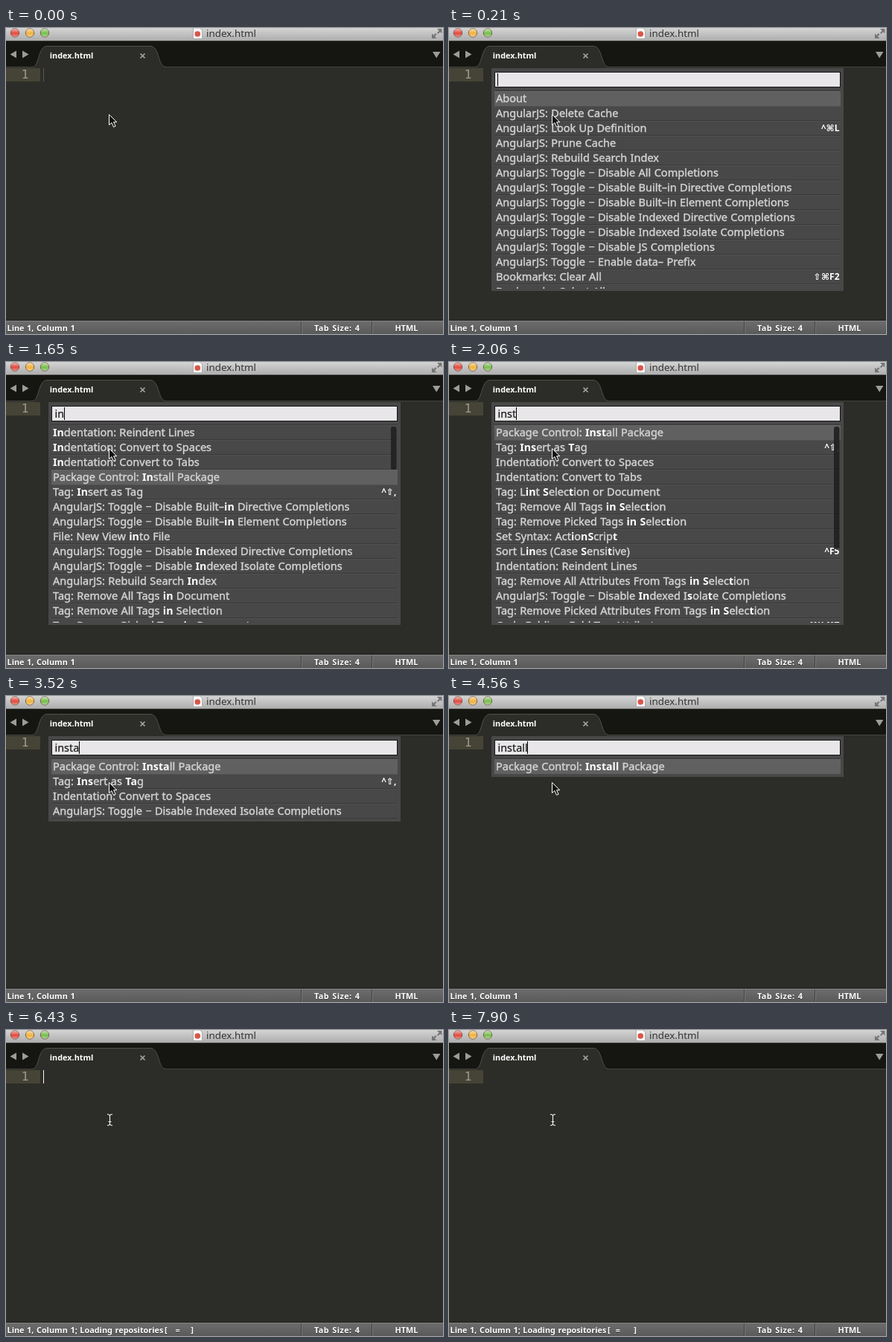
An HTML page that plays this animation: 587 px wide and 412 px high, repeating every 8 s.

```html
<!DOCTYPE html>
<html lang="en">
<head>
<meta charset="utf-8">
<title>Editor command palette</title>
<style>
html, body { margin: 0; width: 100%; height: 100%; overflow: hidden; background: #2c2d28; }
svg { display: block; width: 587px; height: 412px; }
text { white-space: pre; font-family: "Noto Sans", "Open Sans", sans-serif; }
.ui { font-weight: 700; font-size: 10.85px; word-spacing: .8px; fill: #fff; }
.status { filter: drop-shadow(0 1px 0 #333); }
.row { font-size: 14.55px; word-spacing: .5px; fill: #d4d4d4; stroke: #d4d4d4; stroke-width: .4px; }
.row .hit { font-weight: 700; font-size: 14.2px; fill: #fff; stroke: none; }
.keys { font: 700 12px "Noto Sans", "DejaVu Sans", sans-serif; fill: #fff; text-anchor: end; }
#query { font-size: 14.4px; fill: #1c1c1c; stroke: #1c1c1c; stroke-width: .2px; }
</style>
</head>
<body>
<svg viewBox="0 0 587 412">
  <defs>
    <linearGradient id="title" x2="0" y2="1"><stop stop-color="#d4d4d4"/><stop offset="1" stop-color="#adadad"/></linearGradient>
    <linearGradient id="bar" x2="0" y2="1"><stop stop-color="#6d6d6d"/><stop offset="1" stop-color="#5a5a5a"/></linearGradient>
    <linearGradient id="gloss" x2="0" y2="1"><stop stop-color="#fff" stop-opacity=".6"/><stop offset=".55" stop-color="#fff" stop-opacity="0"/><stop offset="1" stop-color="#fff" stop-opacity=".4"/></linearGradient>
    <clipPath id="view"><rect x="57" y="84" width="473" height="267"/></clipPath>
  </defs>

  <rect width="587" height="412" fill="#2c2d28"/>

  <!-- title bar -->
  <rect width="587" height="17" fill="url(#title)"/>
  <rect y="17" width="587" height="1" fill="#3c3c3a"/>
  <g id="lights"></g>
  <path d="M251.5 0V14.5H263.5V3L260.5 0Z" fill="#fafafa" stroke="#999" stroke-width=".7"/>
  <circle cx="257.3" cy="8" r="3.8" fill="#d8574a"/>
  <text x="269" y="12" font-size="13.4" fill="#333">index.html</text>
  <path d="M579 1h6.5v6.5l-2.3-2.3-2.7 2.7-1.5-1.5 2.7-2.7ZM578.5 14H572V7.5l2.3 2.3 2.7-2.7 1.5 1.5-2.7 2.7Z" fill="#757575"/>

  <!-- tab strip -->
  <rect y="18" width="587" height="35" fill="#151611"/>
  <rect y="52" width="587" height="1" fill="#44453e"/>
  <path d="M36 53C45 51 43 24.5 55 24.5H194C206 24.5 204 51 214 53Z" fill="#2c2d28"/>
  <path d="M36 52.5C45 51 43 24.5 55 24.5H194C206 24.5 204 51 214 52.5" fill="none" stroke="#50514a"/>
  <path d="M14 30.5V40.5L5.5 35.5ZM22 30.5V40.5L30.5 35.5ZM573 32H583.5L578.2 40.5Z" fill="#9c9c98"/>
  <text class="ui" x="58.8" y="41">index.html</text>
  <path d="M180.5 34.5l6 6m0-6l-6 6" stroke="#a5a5a0" stroke-width="1.7"/>

  <!-- editor -->
  <rect y="54" width="46" height="18" fill="#464436"/>
  <text x="20.8" y="68" style="font:16px 'DejaVu Sans Mono',monospace" fill="#9b9b92">1</text>
  <rect id="caret" x="50" y="54" width="1" height="18" fill="#f8f8f0"/>

  <!-- status bar -->
  <rect y="393" width="587" height="1" fill="#1d1e1a"/>
  <rect y="394" width="587" height="18" fill="url(#bar)"/>
  <rect y="394" width="587" height="1" fill="#828282"/>
  <path d="M396.5 395V412M491.5 395V412" stroke="#424242"/>
  <path d="M397.5 395V412M492.5 395V412" stroke="#777"/>
  <g class="status">
    <text class="ui" id="where" x="1.5" y="408"></text>
    <text class="ui" id="loader" x="213" y="408"></text>
    <text class="ui" x="414" y="408" style="letter-spacing:.45px">Tab Size: 4</text>
    <text class="ui" x="522.5" y="408">HTML</text>
  </g>

  <!-- command palette -->
  <g id="palette">
    <rect id="panel" x="57" y="54" width="473" fill="#484848"/>
    <rect x="61.5" y="59.5" width="464" height="20" fill="#e8e6e8" stroke="#161616"/>
    <text id="query" x="65.5" y="75"></text>
    <rect id="cursor" y="61" width="1" height="17" fill="#000"/>
    <g id="rows" clip-path="url(#view)"></g>
    <rect id="thumb" x="517" y="87" width="7.5" rx="3" fill="#202020" fill-opacity=".9"/>
  </g>

  <!-- mouse pointers -->
  <path id="arrow" transform="translate(138.5 116.5)" d="M0 0V14L3.4 11 6 16.8 8.6 15.7 6.1 10.2H10.3Z" fill="#111" stroke="#fff"/>
  <g id="beam" fill="none">
    <path d="M136 113.5q3.5 0 3.5 2.5V126q0 2.5-3.5 2.5M143 113.5q-3.5 0-3.5 2.5M139.5 126q0 2.5 3.5 2.5M137.5 123.5h4" stroke="#f4f4f4" stroke-width="1.1"/>
  </g>
</svg>
<script>
const LOOP = 8000, ROW = 20, TOP = 85;
const $ = id => document.getElementById(id);

// Square brackets mark matched letters; text after "|" is the shortcut.
const toggle = 'AngularJS: Toggle − ';
const all = [
  'About', 'AngularJS: Delete Cache', 'AngularJS: Look Up Definition|^⌘L',
  'AngularJS: Prune Cache', 'AngularJS: Rebuild Search Index',
  toggle + 'Disable All Completions',
  toggle + 'Disable Built–in Directive Completions',
  toggle + 'Disable Built–in Element Completions',
  toggle + 'Disable Indexed Directive Completions',
  toggle + 'Disable Indexed Isolate Completions',
  toggle + 'Disable JS Completions', toggle + 'Enable data– Prefix',
  'Bookmarks: Clear All|⇧⌘F2', 'Bookmarks: Select All'
];
const forIn = [
  '[In]dentation: Reindent Lines', '[In]dentation: Convert to Spaces',
  '[In]dentation: Convert to Tabs', 'Package Control: [In]stall Package',
  'Tag: [In]sert as Tag|^⇧,',
  toggle + 'Disable Built–[in] Directive Completions',
  toggle + 'Disable Built–[in] Element Completions',
  'File: New View [in]to File',
  toggle + 'Disable [In]dexed Directive Completions',
  toggle + 'Disable [In]dexed Isolate Completions',
  'AngularJS: Rebuild Search [In]dex',
  'Tag: Remove All Tags [in] Document', 'Tag: Remove All Tags [in] Selection',
  'Tag: Remove Picked Tags [in] Document'
];
const forInst = [
  'Package Control: [Inst]all Package', 'Tag: [Ins]ert as [T]ag|^⇧,',
  'Indentation: Convert to Spaces', 'Indentation: Convert to Tabs',
  'Tag: L[in]t [S]elec[t]ion or Document',
  'Tag: Remove All Tags [in] [S]elec[t]ion',
  'Tag: Remove Picked Tags [in] [S]elec[t]ion',
  'Set Syntax: Act[i]o[nS]crip[t]', 'Sort L[in]es (Case [S]ensi[t]ive)|^F5',
  'Indentation: Reindent Lines',
  'Tag: Remove All Attributes From Tags [in] [S]elec[t]ion',
  toggle + 'Disable [In]dexed I[s]ola[t]e Completions',
  'Tag: Remove Picked Attributes From Tags [in] [S]elec[t]ion',
  'Code Folding: Fold Tag Attributes|⌘K,⌘T'
];
const forI = forIn.map(s => s.replace(/\[(i)n\]/i, '[$1]n'));
const forIns = forInst.map(s => s.replace('[Inst]', '[Ins]t').replace(/\[(t)\]/gi, '$1'));
const forInsta = [
  'Package Control: [Insta]ll Package', 'Tag: [Ins]ert as [Ta]g|^⇧,',
  'Indentation: Convert to Spaces', toggle + 'Disable Indexed Isolate Completions'
];

const typed = (query, list, pick = 0, thumb = 0) => ({ query, list, pick, thumb, cursor: 1 });
const load = (caret, pos) => ({ caret, pos });

// Each entry overrides the state from its time on.
const events = [
  [0, { caret: .22, cursor: 0, list: null, pos: -1, beam: false }],
  [210, { caret: 0, ...typed('', all) }],
  [410, { cursor: .5 }], [620, { cursor: 0 }],
  [1030, { cursor: .5 }], [1240, { cursor: 1 }],
  [1440, typed('i', forI, 3, 50)],
  [1650, typed('in', forIn, 3, 58)],
  [1850, typed('ins', forIns, 0, 120)],
  [2060, typed('inst', forInst, 0, 165)],
  [2270, typed('insta', forInsta)],
  [2680, { cursor: .5 }], [2890, { cursor: 0 }],
  [3310, { cursor: .5 }], [3520, { cursor: 1 }],
  [3730, { cursor: .5 }], [3930, { cursor: 0 }],
  [4350, typed('instal', ['Package Control: [Instal]l Package'])],
  [4560, typed('install', ['Package Control: [Install] Package'])],
  [4980, { list: null, caret: .5, beam: true }],
  [5180, { caret: 1 }],
  [5390, load(1, 1)], [5600, load(.5, 3)], [5800, load(0, 5)], [6010, load(.5, 7)],
  [6220, load(1, 5)], [6430, load(1, 3)], [6640, load(.5, 1)], [6850, load(0, 2)],
  [7060, load(.5, 4)], [7270, load(1, 6)], [7690, load(.5, 4)], [7900, load(0, 2)]
];
let state = {};
const states = events.map(([, change]) => state = { ...state, ...change });

$('lights').innerHTML = ['#e2493f', '#efb23c', '#77bd4c'].map((color, i) => {
  const at = `cx="${12 + 20 * i}" cy="6.5" r="5.7"`;
  return `<circle ${at} fill="${color}" stroke="#6b4a3c" stroke-width=".9"/><circle ${at} fill="url(#gloss)"/>`;
}).join('');

function rowMarkup(item, i, pick) {
  const [label, keys = ''] = item.split('|');
  const y = TOP + i * ROW;
  const [fill, edge] = i === pick ? ['#606060', '#606060'] : ['#484848', '#393939'];
  const text = label.replace(/\[(.+?)\]/g, '<tspan class="hit">$1</tspan>');
  return `<rect x="61" y="${y}" width="465" height="20" fill="${fill}"/>
    <rect x="61" y="${y + 19}" width="465" height="1" fill="${edge}"/>
    <rect x="61" y="${y}" width="465" height="1" fill="#fff" fill-opacity=".05"/>
    <text class="row" x="63" y="${y + 15}">${text}</text>
    <text class="keys" x="524.5" y="${y + 13.5}">${keys}</text>`;
}

const show = (id, on) => $(id).style.display = on ? '' : 'none';

function draw(s) {
  $('caret').style.opacity = s.caret;
  show('arrow', !s.beam);
  show('beam', s.beam);
  const loading = s.pos >= 0;
  $('where').textContent = 'Line 1, Column 1' + (loading ? '; Loading repositories' : '');
  $('loader').textContent = loading ? `[${' '.repeat(s.pos)}=${' '.repeat(7 - s.pos)}]` : '';
  show('palette', s.list);
  if (!s.list) return;
  $('panel').setAttribute('height', Math.min(300, 35 + s.list.length * ROW));
  $('query').textContent = s.query;
  const width = s.query ? $('query').getComputedTextLength() : 0;
  $('cursor').setAttribute('x', Math.floor(65.6 + width));
  $('cursor').style.opacity = s.cursor;
  $('rows').innerHTML = '<rect x="61" y="84" width="465" height="1" fill="#393939"/>' +
    s.list.map((item, i) => rowMarkup(item, i, s.pick)).join('');
  $('thumb').setAttribute('height', s.thumb);
}

const start = performance.now();
let shown = -1;
function tick() {
  const t = (performance.now() - start) % LOOP;
  const now = events.findLastIndex(([at]) => at <= t);
  if (now !== shown) draw(states[shown = now]);
  requestAnimationFrame(tick);
}
tick();
</script>
</body>
</html>
```
